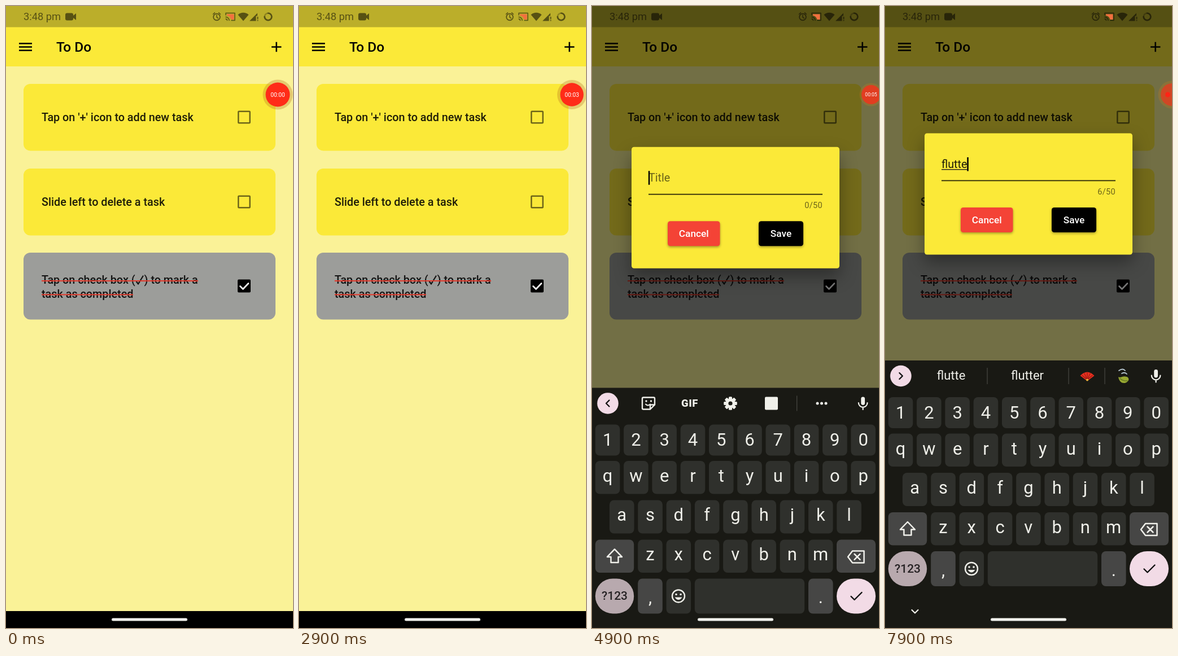
These frames come from a looping animation (508 by 1102 pixels, 8 s). An HTML page:

```html
<!DOCTYPE html>
<html lang="en">
<head>
<meta charset="utf-8">
<title>To Do</title>
<style>
  html, body { margin: 0; width: 100%; height: 100%; overflow: hidden; background: #000; }
  svg { display: block; width: 100vw; height: 100vh; font-family: Roboto, "Open Sans", sans-serif; }
  .medium { font-weight: 500; }
  .mid { text-anchor: middle; }
  .end { text-anchor: end; }
  .line { fill: none; stroke-linecap: round; stroke-linejoin: round; }
  .panel { filter: drop-shadow(0 14px 15px rgba(0, 0, 0, .36)); }
  .button { filter: drop-shadow(0 2px 2px rgba(0, 0, 0, .35)); }
</style>
</head>
<body>
<svg id="stage" viewBox="0 0 508 1102" xmlns="http://www.w3.org/2000/svg"></svg>
<script>
const LOOP = 8000;
const YELLOW = '#fbe938', PINK = '#f2dbe6', KEY = '#2f302c', KEY_ALT = '#464645', INK = '#f0f0ea';
const WORD = 'flutte';
const TYPED_AT = [6900, 7080, 7240, 7400, 7540, 7680];

const rect = (x, y, w, h, fill, r = 0, extra = '') =>
  `<rect x="${x}" y="${y}" width="${w}" height="${h}" rx="${r}" fill="${fill}" ${extra}/>`;
const circle = (x, y, r, fill, extra = '') =>
  `<circle cx="${x}" cy="${y}" r="${r}" fill="${fill}" ${extra}/>`;
const text = (x, y, size, str, cls = '', fill = '#000', extra = '') =>
  `<text x="${x}" y="${y}" font-size="${size}" class="${cls}" fill="${fill}" ${extra}>${str}</text>`;
const line = (d, color, width, extra = '') =>
  `<path class="line" d="${d}" stroke="${color}" stroke-width="${width}" ${extra}/>`;
const shape = (d, fill) => `<path d="${d}" fill="${fill}"/>`;
const group = (id, body, extra = '') => `<g id="${id}" ${extra}>${body}</g>`;

function statusBar() {
  return `<g opacity=".53">
    ${text(31, 25, 18.3, '3:48 pm')}
    ${rect(105, 12.5, 14, 13, '#000', 3)}${shape('M119 17l5-4v12l-5-4z', '#000')}
    ${circle(373, 19.5, 5.9, 'none', 'stroke="#000" stroke-width="1.7"')}
    ${line('M373 16v4l2.5 1.6M366.5 14.5l3-2.6M379.5 14.5l-3-2.6', '#000', 1.5)}
    ${line('M389 16v-3.5h16v13h-6M389 19.5a6 6 0 0 1 6 6M389 23a2.5 2.5 0 0 1 2.5 2.5', '#000', 1.5)}
    ${shape('M410.5 15.5a14 14 0 0 1 19 0l-9.5 11z', '#000')}
    ${shape('M431 26.5l14-14v5h-2.5v9z', '#000')}${rect(444.6, 19, 1.8, 4.5, '#000')}${rect(444.6, 24.7, 1.8, 1.8, '#000')}
    ${circle(464, 19, 6.3, 'none', 'stroke="#000" stroke-width="2.6" opacity=".45"')}
    ${line('M464 12.7a6.3 6.3 0 1 1-6.3 6.3', '#000', 2.6)}</g>`;
}

function card(y, color, label, done) {
  const box = done
    ? rect(410, y + 47.5, 23, 23, '#000', 2) + line(`M414.5 ${y + 59.5}l5 5 9.5-10`, '#fff', 2.6)
    : rect(411.3, y + 48.8, 20.4, 20.4, 'none', 1, 'stroke="#000" stroke-opacity=".56" stroke-width="2.5"');
  return rect(31, y, 446, 118.5, color, 12) + label + box;
}

function page() {
  const ink = 'rgba(0,0,0,.88)', size = 19.76;
  const done = text(63, 491.5, size, 'Tap on check box (', 'medium', ink)
    + line('M231 488.5l3 4 8.5-14', ink, 2.2)
    + text(244.5, 491.5, size, ') to mark a', 'medium', ink)
    + text(63, 516.5, size, 'task as completed', 'medium', ink)
    + rect(63, 486, 277, 2, '#e23a2c') + rect(63, 510.4, 162, 2, '#e23a2c');
  return rect(0, 0, 508, 1072, '#faf297')
    + rect(0, 0, 508, 107, YELLOW)
    + circle(478, 72, 38, '#000', 'id="ripple" clip-path="inset(0)"')
    + rect(0, 0, 508, 37.5, '#bbae2a')
    + rect(23, 65.2, 23, 2.5, '#000') + rect(23, 71.3, 23, 2.5, '#000') + rect(23, 77.4, 23, 2.5, '#000')
    + rect(470, 71.3, 17.4, 2.5, '#000') + rect(477.4, 63.8, 2.5, 17.4, '#000')
    + text(89, 81, 24.4, 'To Do', 'medium')
    + statusBar()
    + card(138, YELLOW, text(63, 204, size, "Tap on '+' icon to add new task", 'medium', ink))
    + card(288, YELLOW, text(63, 354, size, 'Slide left to delete a task', 'medium', ink))
    + card(437, '#9c9d9a', done, true);
}

function dialog() {
  const button = (x, w, fill, label) => rect(x, 579, w, 44, fill, 4.5, 'class="button"')
    + text(x + w / 2, 607, 17.3, label, 'medium mid', '#fff');
  return rect(70, 447.5, 368, 215, YELLOW, 4.5, 'class="panel"')
    + text(100, 508.5, 19.76, 'Title', '', 'rgba(0,0,0,.58)', 'id="hint"')
    + text(100, 508.5, 19.76, '', '', 'rgba(0,0,0,.88)', 'id="entry"')
    + rect(100, 511, 0, 1.4, '#222', 0, 'id="composing"')
    + rect(100, 490, 2.5, 24.5, '#000', 0, 'id="cursor"')
    + rect(100, 530.5, 308, 1.8, '#2b2808')
    + text(408, 555.5, 14.5, '', 'end', 'rgba(0,0,0,.58)', 'id="count" letter-spacing=".3"')
    + button(134, 92.5, '#f44336', 'Cancel') + button(295, 79, '#000', 'Save');
}

function toolbar() {
  const teeth = [0, 45, 90, 135].map(a =>
    rect(242, 643.7, 6, 23.6, INK, 1.5, `transform="rotate(${a} 245 655.5)"`)).join('');
  return line('M30.5 650l-5.5 5.5 5.5 5.5', '#111', 2.3)
    + line('M91 645h18a2 2 0 0 1 2 2v11l-8 8h-12a2 2 0 0 1-2-2v-17a2 2 0 0 1 2-2zM111 658h-6a2 2 0 0 0-2 2v6', INK, 2.4)
    + circle(96, 651.5, 1.7, INK) + circle(104.5, 651.5, 1.7, INK) + line('M95 657q4 4 8 0', INK, 2)
    + text(173, 662, 18.5, 'GIF', 'mid', INK, 'font-weight="900" letter-spacing=".6"')
    + teeth + circle(245, 655.5, 8.5, INK) + circle(245, 655.5, 3.6, '#191914')
    + rect(306, 644, 23, 23, INK, 2)
    + rect(362, 642, 1.3, 27, '#45453f')
    + [399, 406.5, 414].map(x => circle(x, 655.5, 2.5, INK)).join('');
}

function suggestions() {
  const ribs = [-50, -25, 0, 25, 50].map(a =>
    line('M358 662v-12', '#8d1712', 1, `transform="rotate(${a} 358 662)"`)).join('');
  return line('M25.5 650l5.5 5.5-5.5 5.5', '#111', 2.3)
    + text(117, 662, 22, '', 'mid', INK, 'id="guess"')
    + text(252, 662, 22, 'flutter', 'mid', INK)
    + [181, 325, 389].map(x => rect(x - .6, 641, 1.3, 29, '#45453f')).join('')
    + shape('M345.5 655q12.5-13 25 0l-10.5 8h-4z', '#e8301f') + ribs + circle(358, 662.5, 2, '#f0b53a')
    + line('M414 646q7-5 11 0M419 651q6-3 9 1', '#b9c8d2', 1.8)
    + shape('M413 657c4 3 8-3 15 0 7 3 2 11-5 11-6 0-9-5-10-11z', '#98a832')
    + line('M416 660q6 5 13 4', '#5f7420', 1.3);
}

function keyboard() {
  const key = (x, y, w, h, label = '', fill = KEY, base = 0) => rect(x, y, w, h, fill, 8)
    + text(x + w / 2, base, 31, label, 'mid', INK);
  const row = (letters, x, y, h, base) =>
    [...letters].map((c, i) => key(x + 50.28 * i, y, 43.6, h, c, KEY, base)).join('');
  return rect(0, 628, 508, 474, '#191914')
    + circle(28, 655.5, 18.8, PINK)
    + group('tools', toolbar()) + group('words', suggestions())
    + rect(476.2, 644, 6.8, 14.5, INK, 3.4)
    + line('M471.8 654.5a7.8 7.8 0 0 0 15.6 0M479.6 662.5v4', INK, 2.2)
    + row('1234567890', 5.8, 693, 55, 731)
    + row('qwertyuiop', 5.8, 757.5, 58.5, 794.5)
    + row('asdfghjkl', 31, 827, 59, 864)
    + row('zxcvbnm', 81.2, 897, 58.5, 933.5)
    + key(5.8, 897, 68.4, 58.5, '', KEY_ALT) + key(433, 897, 69, 58.5, '', KEY_ALT)
    + line('M40 914l13 13.5h-6.5v10h-13v-10H27z', INK, 2.5)
    + line('M461 917h20.5v21H461l-8-10.5zM464.5 922.5l10 10M474.5 922.5l-10 10', INK, 2.5)
    + rect(5.8, 966, 68.4, 62, '#b8a9ae', 31) + text(40, 1003.5, 21, '?123', 'mid medium', '#262224')
    + key(81.2, 966, 43.6, 62, ',', KEY_ALT, 1010) + key(131.5, 966, 43.6, 62)
    + circle(153, 997, 11, 'none', `stroke="${INK}" stroke-width="2.4"`)
    + circle(149, 994, 1.8, INK) + circle(157, 994, 1.8, INK) + shape('M146.5 999h13q-6.5 9-13 0z', INK)
    + key(181.8, 966, 194.4, 62) + key(383, 966, 43.6, 62, '.', KEY_ALT, 1010)
    + rect(433, 966, 69, 62, PINK, 31) + line('M458.5 997.5l6 6 13-13', '#111', 2.4)
    + line('M47.5 1070l5.5 5.5 5.5-5.5', INK, 2.2);
}

function bubble() {
  return circle(0, 157, 26, '#b87820', 'id="halo" fill-opacity=".34"')
    + circle(0, 157, 21, '#ff2c18', 'id="disc"')
    + circle(500.5, 157, 4.5, '#ff2416', 'id="dot"')
    + text(0, 0, 10, '', 'mid', '#fff', 'id="timer"');
}

document.getElementById('stage').innerHTML = page()
  + rect(0, 0, 508, 1072, '#000', 0, 'id="scrim"')
  + shape('M391 14.5h12.5v9.5h-5q-1.500-6-7.500-7z', '#f2703f')
  + rect(0, 1072, 508, 30, '#000')
  + group('dialog', dialog()) + group('keyboard', keyboard())
  + rect(187, 1084.5, 134, 5, '#f4f4ee', 2.5)
  + group('bubble', bubble());

const $ = id => document.getElementById(id);
const set = (id, attrs) => { for (const k in attrs) $(id).setAttribute(k, attrs[k]); };
const show = (id, on) => set(id, { visibility: on ? 'visible' : 'hidden' });
const ramp = (t, from, to) => Math.min(1, Math.max(0, (t - from) / (to - from)));
const easeOut = p => 1 - (1 - p) ** 3;

// start, end, then x, halo radius, disc radius, disc opacity, timer size
const BUBBLE = [
  [0, 1, 481, 26.5, 21.5, 1, 10.3],
  [500, 700, 483, 26, 20.7, 1, 10.3],
  [3000, 3300, 494, 20.5, 17, .74, 8.6],
  [7300, 7600, 508, 24.5, 20, .6, 8.6],
];

function drawBubble(t) {
  let now = BUBBLE[0].slice(2);
  for (const [from, to, ...goal] of BUBBLE) {
    const p = easeOut(ramp(t, from, to));
    now = now.map((v, i) => v + (goal[i] - v) * p);
  }
  const [x, halo, disc, opacity, size] = now;
  const docked = t >= 7300;
  set('halo', { cx: x, r: halo });
  set('disc', { cx: x, r: disc, 'fill-opacity': opacity });
  set('timer', { x, y: 157 + size * .36, 'font-size': size });
  $('timer').textContent = '00:0' + Math.floor((t + 400) / 1000);
  show('timer', !docked);
  show('dot', docked);
}

function drawEntry(t) {
  const typed = WORD.slice(0, TYPED_AT.filter(at => t >= at).length);
  const typing = typed.length > 0;
  $('entry').textContent = $('guess').textContent = typed;
  $('count').textContent = typed.length + '/50';
  const width = typing ? $('entry').getComputedTextLength() : 0;
  const phase = t % 1000;
  set('composing', { width });
  set('cursor', { x: 99.8 + width });
  show('cursor', typing || phase < 350 || phase >= 850);
  show('hint', !typing);
  show('tools', !typing);
  show('words', typing);
}

function draw(t) {
  const open = ramp(t, 4130, 4280);
  const raised = 474 * easeOut(ramp(t, 4720, 5060));
  set('ripple', { opacity: t > 4000 && t < 4450 ? .025 : 0 });
  set('scrim', { opacity: .54 * open });
  set('dialog', {
    opacity: open,
    display: open ? 'inline' : 'none',
    transform: `translate(0 ${-Math.max(0, raised - 30) / 2})`,
  });
  set('keyboard', {
    display: raised ? 'inline' : 'none',
    transform: `translate(0 ${474 - raised})`,
  });
  drawEntry(t);
  drawBubble(t);
}

const start = performance.now();
function tick() {
  draw((performance.now() - start) % LOOP);
  requestAnimationFrame(tick);
}
tick();
</script>
</body>
</html>
```
